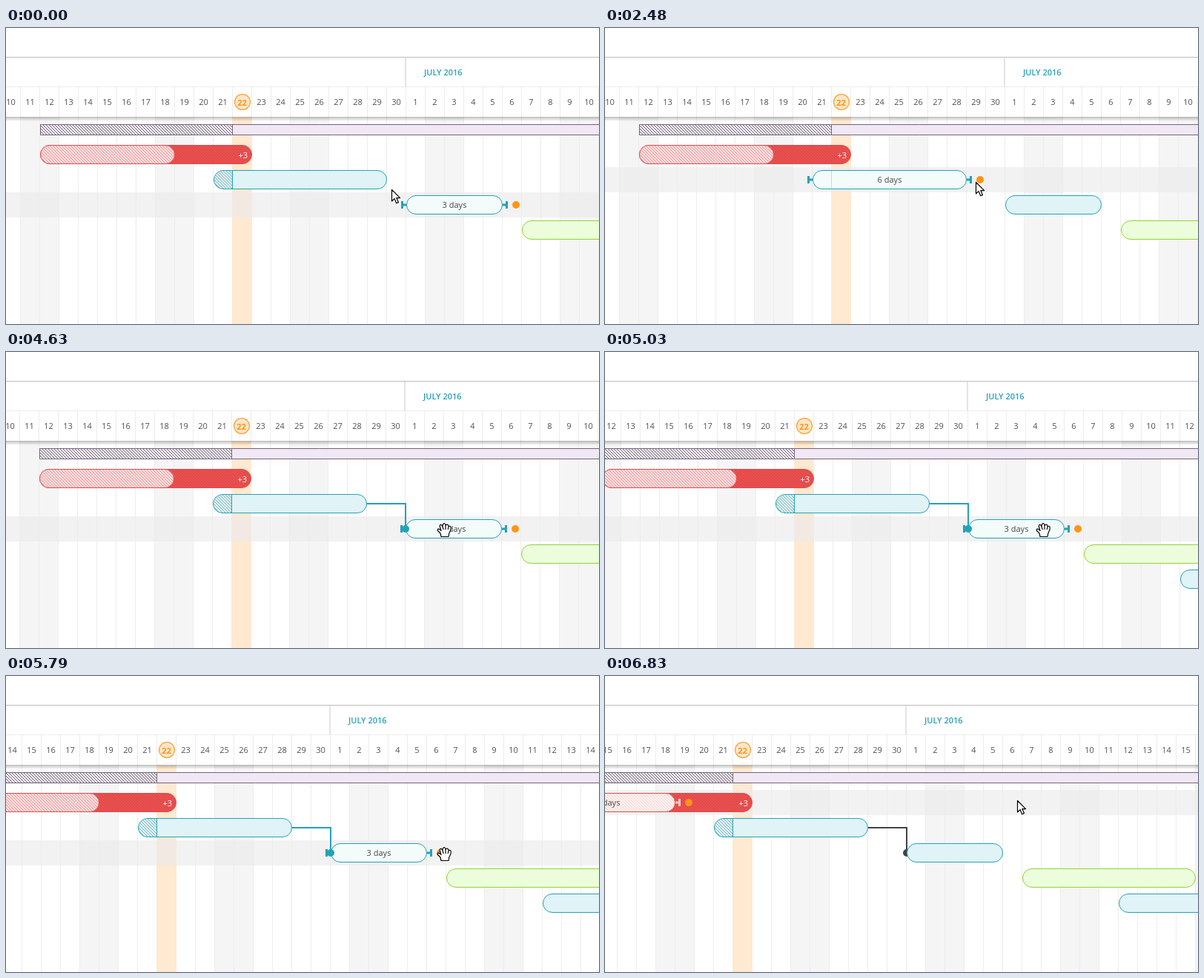
Write an HTML page with a canvas that moves like this. It is 800 px wide and 400 px high and loops after 7.56 s.

```html
<!DOCTYPE html>
<html lang="en">
<head>
<meta charset="utf-8">
<title>Gantt chart</title>
<style>
  html, body { margin: 0; width: 100%; height: 100%; overflow: hidden; background: #fff; }
  canvas { display: block; }
</style>
</head>
<body>
<canvas id="stage" width="800" height="400"></canvas>
<script>
const ctx = document.getElementById('stage').getContext('2d');
const LOOP = 7560, W = 800, H = 400, DAY = 26, ROW = 34, BAR = 26, HEADER = 120;
const FONT = '"Open Sans", sans-serif';
const TEAL = '#22a2b8', ORANGE = '#ff9416', RED = '#e5484a', INK = '#444';
const BLUE_FILL = '#e0f3f7', HOVER_FILL = '#f4fcfb';
const TODAY = 12, JULY = 21;

// Keyframes: [time, ...values]
const PAN = [[4620, 0], [4630, 1], [5030, 50], [5410, 74], [6090, 124], [6190, 124], [6830, 133]];
const POINTER = [
  [30, 520, 218], [240, 504, 207], [600, 504, 207], [830, 519, 208],
  [1040, 519, 208], [1430, 493, 208], [1600, 493, 208], [1780, 473, 207],
  [1950, 473, 207], [2320, 500, 208], [2480, 500, 208], [3210, 579, 221],
  [3230, 579, 221], [3490, 586, 233], [6170, 586, 233], [6830, 556, 168]
];

const SHAPES = {
  arrow: new Path2D('M.5 .5V16L4 12.6 6.7 18.8 9.4 17.6 6.8 11.6H11.6Z'),
  resize: new Path2D('M-10.5 0L-5.5-5V-1.5H5.5V-5L10.5 0L5.5 5V1.5H-5.5V5Z'),
  hand: new Path2D('M5 18.5L4 14 .5 10.5Q-.5 8.5 1.5 8.2Q3 8.2 5 10.5L3.2 4.5Q3.2 2.2 5 2.3' +
    'Q6.2 2.5 7 5L7.4 2.2Q8.2 .3 9.6 .7Q11 1.2 11 4Q12 1.6 13.5 2.1Q15 2.6 15 5.2' +
    'Q16.2 3.6 17.6 4.7Q18.6 5.7 18 9.2L15.8 14 15 18.5Z' +
    'M7 5L8.2 9M11 4V9M15 5L14.2 9')
};

const smooth = u => u * u * (3 - 2 * u);
const dayX = k => k * DAY - 6;
const rowTop = r => HEADER + r * ROW;

function track(keys, t, ease = u => u) {
  if (t <= keys[0][0]) return keys[0].slice(1);
  const i = keys.findIndex(k => k[0] > t);
  if (i < 0) return keys[keys.length - 1].slice(1);
  const [a, b] = [keys[i - 1], keys[i]];
  const u = ease((t - a[0]) / (b[0] - a[0]));
  return a.slice(1).map((v, n) => v + (b[n + 1] - v) * u);
}

function rect(x, y, w, h, color) {
  ctx.fillStyle = color;
  ctx.fillRect(x, y, w, h);
}

function text(str, x, y, color = INK, align = 'center', weight = 400) {
  ctx.font = `${weight} 11px ${FONT}`;
  ctx.textAlign = align;
  ctx.fillStyle = color;
  ctx.fillText(str, x, y);
}

function disc(x, y, r, color) {
  ctx.beginPath();
  ctx.arc(x, y, r, 0, 7);
  ctx.fillStyle = color;
  ctx.fill();
}

function line(points, color, width) {
  ctx.beginPath();
  points.forEach(p => ctx.lineTo(...p));
  ctx.strokeStyle = color;
  ctx.lineWidth = width;
  ctx.stroke();
}

function pill(x0, x1, y, fill, stroke, h = BAR, r = 12.5) {
  ctx.beginPath();
  ctx.roundRect(x0 + .5, y + .5, x1 - x0 - 1, h - 1, r);
  ctx.fillStyle = fill;
  ctx.fill();
  ctx.strokeStyle = stroke;
  ctx.lineWidth = 1;
  ctx.stroke();
}

// Diagonal strokes within the current path, limited to x0..x1
function hatch(x0, x1, y, h, color, width = 1, gap = 4) {
  ctx.save();
  ctx.clip();
  ctx.beginPath();
  ctx.rect(x0, y, x1 - x0, h);
  ctx.clip();
  ctx.beginPath();
  for (let x = x0 - h; x < x1; x += gap) {
    ctx.moveTo(x, y);
    ctx.lineTo(x + h, y + h);
  }
  ctx.strokeStyle = color;
  ctx.lineWidth = width;
  ctx.stroke();
  ctx.restore();
}

function handles(x0, x1, y, color, dot = true) {
  const mid = y + 13;
  rect(x0 - 7, mid - 5, 3, 10, color);
  rect(x0 - 5, mid - 1.5, 5, 3, color);
  rect(x1, mid - 1.5, 5, 3, color);
  rect(x1 + 4, mid - 5, 3, 10, color);
  if (dot) disc(x1 + 18, mid, 5, ORANGE);
}

function grid(hoverRow) {
  for (let k = 0; k < 38; k++) {
    const x = dayX(k);
    if (k % 7 === 1 || k % 7 === 2) rect(x, HEADER, DAY, H, '#f5f5f5');
  }
  for (let k = 0; k < 38; k++) rect(dayX(k) - 1, HEADER, 1, H, '#ededed');
  rect(dayX(TODAY) - 1, HEADER, DAY + 1, H, '#ffe9d0');
  rect(0, rowTop(hoverRow), 1000, ROW, 'rgba(235,235,235,.66)');
}

function header() {
  const shade = ctx.createLinearGradient(0, HEADER, 0, HEADER + 6);
  shade.addColorStop(0, 'rgba(0,0,0,.26)');
  shade.addColorStop(1, 'rgba(0,0,0,0)');
  rect(0, HEADER, 1000, 6, shade);
  rect(0, 0, 1000, HEADER, '#fff');
  rect(0, 39, 1000, 1, '#bdbdbd');
  rect(0, 79, 1000, 1, '#ececec');
  rect(dayX(JULY) - 2, 40, 2, 39, '#e4e4e4');
  text('JULY 2016', dayX(JULY) + 24, 64, TEAL, 'left', 600);
  for (let k = 0; k < 38; k++) {
    const x = dayX(k), mid = x + 12.5;
    const label = k < JULY ? k + 10 : k - JULY + 1;
    rect(x - 1, 80, 1, 40, '#ececec');
    if (k === TODAY) {
      disc(mid + .5, 100, 11, ORANGE);
      disc(mid + .5, 100, 10, '#ffe6c9');
      text(label, mid, 105, ORANGE, 'center', 700);
    } else {
      text(label, mid, 104, '#505050');
    }
  }
}

function summaryBar() {
  const split = dayX(TODAY);
  pill(46, 1100, 130, '#f0e8f4', '#7a617f', 15, 0);
  pill(46, split, 130, '#fff', '#7a617f', 15, 0);
  hatch(47, split - 1, 131, 13, '#5f4a66');
}

function lateBar(hovered) {
  const y = rowTop(1) + 4, end = 228;
  pill(46, 332, y, '#e9504f', RED);
  hatch(46, 332, y, BAR, 'rgba(190,40,45,.28)');
  pill(46, end, y, hovered ? '#fff1ef' : '#fbdada', RED);
  hatch(47, end - 1, y + 1, BAR - 2, hovered ? '#f9d3d0' : '#e79a9a');
  text('+3', 326, y + 18, '#fff', 'right');
  if (hovered) {
    text('5 days', (46 + end) / 2, y + 17);
    handles(46, end, y, '#f9c9c6');
  }
}

function startedBar(end, state) {
  const x = 280, y = rowTop(2) + 4, split = dayX(TODAY) - .5;
  const hovered = state !== 'idle';
  pill(x, end, y, hovered ? HOVER_FILL : BLUE_FILL, TEAL);
  if (!hovered) {
    hatch(x + 1, split, y + 1, BAR - 2, '#72aebb');
    line([[split, y], [split, y + BAR]], TEAL, 1);
    return;
  }
  ctx.setLineDash([1, 1]);
  line([[split, y + 1], [split, y + BAR - 1]], '#a3b5b8', 1);
  ctx.setLineDash([]);
  text(end > 501 ? '7 days' : '6 days', (x + end) / 2, y + 17);
  if (state !== 'linking') handles(x, end, y, TEAL, state === 'hover');
  if (state === 'resizing') {
    text('21 Jun 2016', x - 14, y + 17, INK, 'right');
    text(end > 501 ? '29 Jun 2016' : '28 Jun 2016', end + 14, y + 17, INK, 'left');
  }
}

function nextBar(hovered, dropTarget) {
  const y = rowTop(3) + 4;
  pill(540, 670, y, hovered || dropTarget ? HOVER_FILL : BLUE_FILL, TEAL);
  if (hovered) {
    text('3 days', 605, y + 17);
    handles(540, 670, y, TEAL);
  }
}

function link(color) {
  line([[488, 205], [540, 205], [540, 239]], color, 2);
  disc(540, 239, 5, color);
}

function pointer(kind, x, y) {
  ctx.save();
  ctx.translate(x, y);
  ctx.lineJoin = 'round';
  ctx.fillStyle = '#fff';
  ctx.strokeStyle = '#000';
  ctx.lineWidth = 1.2;
  ctx.fill(SHAPES[kind]);
  ctx.stroke(SHAPES[kind]);
  ctx.restore();
}

function draw(t) {
  const pan = Math.round(track(PAN, t)[0]);
  const [px, py] = track(POINTER, t, smooth).map(Math.round);
  const within = (a, b) => t >= a && t < b;
  const resizing = within(1070, 1440), linking = within(2520, 3640), linked = t >= 3640;

  let row = Math.floor((py - HEADER) / ROW);
  if (t < 80 || within(3640, 6190)) row = 3;

  const end = t < 1070 ? 514 : resizing ? px - 5 : 488;
  let started = row === 2 ? 'hover' : 'idle';
  if (resizing) started = 'resizing';
  else if (linking) started = 'linking';
  else if (within(1440, 1630)) started = 'idle';
  const active = row === 2 || row === 3;

  rect(0, 0, W, H, '#fff');
  ctx.save();
  ctx.translate(-pan, 0);
  grid(row);
  if (linked && !active) link('#424247');
  summaryBar();
  lateBar(row === 1);
  startedBar(end, started);
  nextBar(row === 3 && !linking, linking && t >= 3300);
  pill(696, 930, rowTop(4) + 4, '#ecfddb', '#8fd433');
  pill(826, 1086, rowTop(5) + 4, BLUE_FILL, TEAL);
  if (linked && active) link(TEAL);
  if (linking) line([[488, 205], [px, py]], TEAL, 2);
  header();
  ctx.restore();

  if (within(730, 1640)) pointer('resize', px, py);
  else if (within(4630, 6090)) pointer('hand', 582, 231);
  else pointer('arrow', px, py);
}

const start = performance.now();
function tick() {
  draw((performance.now() - start) % LOOP);
  requestAnimationFrame(tick);
}
tick();
</script>
</body>
</html>
```
